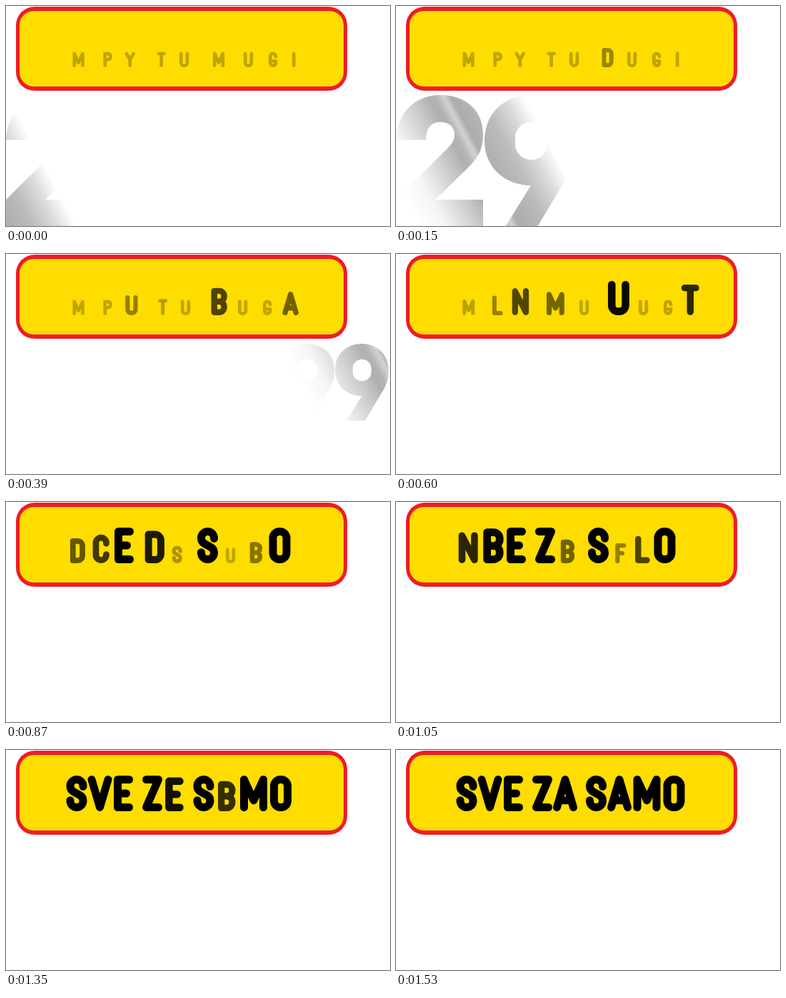
Recreate the animation shown at these times as an HTML page with a canvas. Size 538 px wide and 309 px high, loop 4500 ms.

```html
<!DOCTYPE html>
<html lang="sr">
<head>
<meta charset="utf-8">
<title>Sve za samo</title>
<style>
html, body { margin: 0; width: 100%; height: 100%; overflow: hidden; background: #fff; }
canvas { display: block; }
</style>
</head>
<body>
<canvas id="stage" width="538" height="309" role="img" aria-label="SVE ZA SAMO"></canvas>
<script>
const ctx = document.getElementById('stage').getContext('2d');
const LOOP = 4500, STEP = 30;

// Rounded lettering: width and pen strokes, each point an "xy" pair on a 4 x 8 grid.
const GLYPHS = {
  A: [34, '08 20 48,16 36'],
  B: [29, '00 40 44 04,04 44 48 08,00 08'],
  C: [29, '42 40 00 08 48 46'],
  D: [30, '00 40 48 08,00 08'],
  E: [27, '40 00 08 48,04 34'],
  F: [27, '40 00 08,04 34'],
  G: [29, '42 40 00 08 48 45,45 25'],
  H: [30, '00 08,40 48,04 44'],
  I: [12, '00 08'],
  L: [27, '00 08 48'],
  M: [38, '08 00 26 40 48'],
  N: [31, '08 00 48 40'],
  O: [30, '20 40 48 08 00 20'],
  P: [29, '00 40 44 04,00 08'],
  Q: [30, '20 40 48 08 00 20,26 48'],
  S: [29, '42 40 00 03 45 48 08 06'],
  T: [29, '00 40,20 28'],
  U: [31, '00 08 48 40'],
  V: [34, '00 28 40'],
  Y: [34, '00 24 40,24 28'],
  Z: [28, '00 40 08 48']
};
const CURVED = 'BCDGOPQSU';
const PEN = 11, CAP = 50, BASE = 86, LEFT = 83.5, SPACE = 11, PIVOT = 13;

// Side bearings depend on what the glyph shows on that side.
function bearing(char, stems, bowls) {
  if (stems.includes(char)) return 2.5;
  if (bowls.includes(char)) return 1.5;
  return 'ATVY'.includes(char) ? 0 : 1;
}
const before = char => bearing(char, 'BDEFHILMNPU', 'CGOQ');
const after = char => bearing(char, 'HIMNU', 'BCDGOQ');

// Per letter: forms from first to last while growing, final form, place in the starting order.
const LETTERS = [
  ['MPHBDLANEF', 'S', 5],
  ['PDLFPSCHQB', 'V', 4],
  ['YFUCDNSHLP', 'E', 2],
  ['TAPMSBLCDE', 'Z', 3],
  ['USPCBLHFNE', 'A', 7],
  ['MDPFNBCLEU', 'S', 0],
  ['UCFDLPHBSE', 'A', 8],
  ['GHBDPLCFQN', 'M', 6],
  ['ICENAPLTHS', 'O', 1]
];
const FIRST = 35, STAGGER = 110, GROW = 600, SWAP = 60;

function drawGlyph(char) {
  const [width, strokes] = GLYPHS[char];
  const dx = (width - PEN) / 4, dy = (CAP - PEN) / 8;
  const radius = CURVED.includes(char) ? 9 : 0;
  ctx.beginPath();
  for (const stroke of strokes.split(',')) {
    const pts = stroke.split(' ').map(p => [PEN / 2 + p[0] * dx, PEN / 2 - CAP + p[1] * dy]);
    ctx.moveTo(...pts[0]);
    for (let i = 1; i < pts.length - 1; i++) ctx.arcTo(...pts[i], ...pts[i + 1], radius);
    ctx.lineTo(...pts[pts.length - 1]);
  }
  ctx.stroke();
}

function drawText(t) {
  let x = LEFT;
  ctx.strokeStyle = '#000';
  ctx.lineWidth = PEN;
  ctx.lineCap = ctx.lineJoin = 'round';
  LETTERS.forEach(([forms, last, order], i) => {
    const age = Math.max(0, t - FIRST - order * STAGGER);
    const k = Math.min(1, age / GROW);
    const char = k < 1 ? forms[Math.floor(age / SWAP)] : last;
    const size = 0.43 + 0.57 * k;
    x += before(char);
    ctx.save();
    ctx.globalAlpha = 0.25 + 0.75 * k;
    ctx.translate(x + PIVOT * (1 - size), BASE);
    ctx.scale(size, size);
    drawGlyph(char);
    ctx.restore();
    x += GLYPHS[char][0] + after(char);
    if (i === 2 || i === 4) x += SPACE;
  });
}

function roundBox(x, y, w, h, r, color) {
  ctx.beginPath();
  ctx.roundRect(x, y, w, h, r);
  ctx.fillStyle = color;
  ctx.fill();
}

function drawPlate() {
  roundBox(14, 1, 464, 118, 26, '#f01c24');
  roundBox(19, 7, 454, 106, 20, '#ffdd00');
}

const TWO = new Path2D('M0 63C1 26 26 0 62 0C98 0 122 22 122 55C122 76 115 89 100 103L55 147H122V187H0V147L70 77C77 70 82 65 82 56C82 44 74 38 62 38C49 38 42 47 42 63Z');
const NINE = new Path2D('M28 187L65 127C28 127 0 101 0 64C0 26 28 0 65 0C102 0 130 26 130 64C130 84 126 98 116 115L73 187Z');
const HOLE = new Path2D();
HOLE.roundRect(43, 38, 45, 53, 22);
NINE.addPath(HOLE);

// Digits of the price: shape, x, y, size.
const PRICE = [[TWO, 0, 125, 1], [NINE, 124, 125, 1], [NINE, 256, 125, 1],
  [NINE, 385, 126, 0.577], [NINE, 461, 126, 0.577]];
const SLANT = 0.53, BAND = 245;
const SHEEN = [[0, 255], [0.15, 246], [0.36, 200], [0.45, 176], [0.49, 180], [0.54, 210],
  [0.58, 172], [0.75, 188], [0.88, 218], [1, 255]];

// A slanted silver band speeds up across the white price.
function drawPrice(t) {
  if (t >= 540) return;
  const pos = -309 + 0.91 * t + 0.00177 * t * t;
  const run = BAND / (1 + SLANT * SLANT);
  for (const [shape, x, y, size] of PRICE) {
    const start = (pos - x + SLANT * y) / size, len = run / size;
    const fill = ctx.createLinearGradient(start, 0, start + len, -SLANT * len);
    for (const [at, g] of SHEEN) fill.addColorStop(at, `rgb(${g},${g},${g})`);
    ctx.save();
    ctx.translate(x, y);
    ctx.scale(size, size);
    ctx.fillStyle = fill;
    ctx.fill(shape, 'evenodd');
    ctx.restore();
  }
}

function draw(now) {
  const t = Math.floor((now % LOOP) / STEP) * STEP;
  ctx.fillStyle = '#fff';
  ctx.fillRect(0, 0, 538, 309);
  drawPrice(t);
  drawPlate();
  drawText(t);
}

let origin;
function tick(now) {
  origin ??= now;
  draw(Math.max(0, now - origin));
  requestAnimationFrame(tick);
}
draw(0);
requestAnimationFrame(tick);
</script>
</body>
</html>
```
